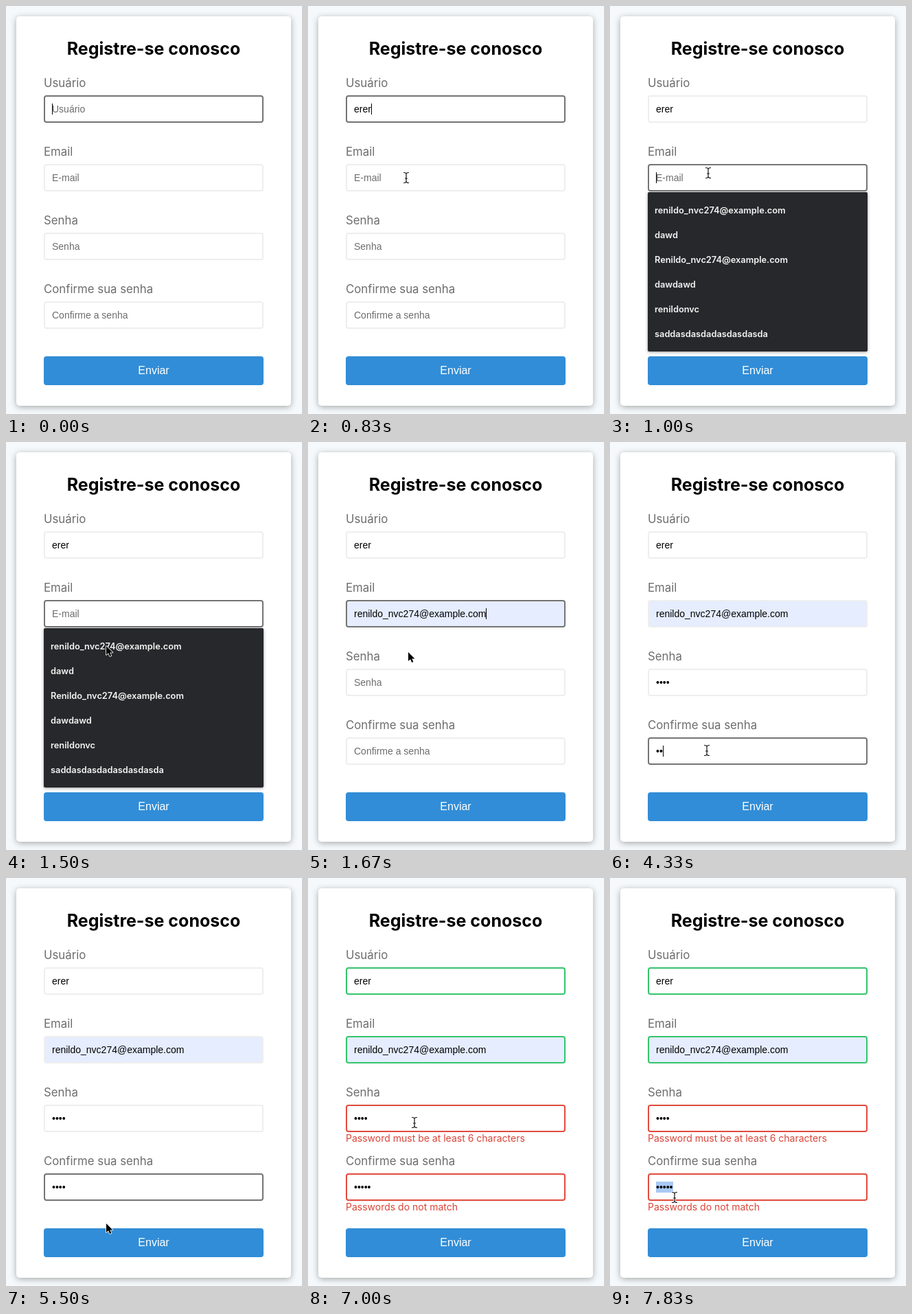
Animation, 431 px wide and 594 px high, one loop 8000 ms. Source, as an HTML page:

```html
<!DOCTYPE html>
<html lang="pt-BR">
<head>
<meta charset="utf-8">
<title>Registre-se conosco</title>
<style>
  html, body { margin: 0; width: 100%; height: 100%; overflow: hidden; background: #f5f9fb; }
  svg { display: block; width: 100%; height: 100%; }
  .card { fill: #fff; filter: drop-shadow(0 2px 5px rgba(0, 0, 0, .32)); }
  .title { font: 700 25px Inter, sans-serif; fill: #000; text-anchor: middle; }
  .label { font: 16.8px Inter, sans-serif; fill: #6d6d6d; }
  .value { font: 14px "Liberation Sans", Arial, sans-serif; fill: #000; }
  .hint { fill: #6c6c6c; }
  .error { font: 14px Inter, sans-serif; fill: #db4437; }
  .button { fill: #318dd7; }
  .send { font: 16px "Liberation Sans", Arial, sans-serif; fill: #fff; text-anchor: middle; }
  .menu { fill: #27282b; filter: drop-shadow(0 1px 2px rgba(0, 0, 0, .4)); }
  .option { font: 600 12.8px Inter, sans-serif; fill: #f4f4f4; }
  .selection { fill: #a9c9f3; }
</style>
</head>
<body>
<svg id="stage" viewBox="0 0 431 594"></svg>
<script>
const LOOP = 8000, STEPS_PER_SECOND = 6;
const EMAIL = 'renildo_nvc274@example.com';
const OPTIONS = [EMAIL, 'dawd', 'Renildo_nvc274@example.com', 'dawdawd', 'renildonvc', 'saddasdasdadasdasdasda'];
const COLORS = { idle: '#eeeeee', focus: '#747474', ok: '#35c46d', bad: '#e14b3d' };

// Steps at which things happen, six per second
const KEYS = { user: [1, 2, 3, 4], password: [16, 17, 18, 19], confirm: [25, 26, 27, 28, 35] };
const FOCUS = [[0, 0], [6, 1], [14, 2], [23, 3], [38, -1]];
const MENU_OPEN = 6, EMAIL_PICKED = 10, SUBMIT = 38, SELECT = 46;
const POINTER = [
  [5, 143, 250], [6, 143, 243], [8, 146, 297], [9, 146, 297], [10, 146, 306],
  [13, 141, 349], [20, 141, 349], [23, 141, 449], [29, 141, 449], [33, 146, 503],
  [36, 148, 529], [39, 148, 529], [42, 155, 356], [44, 132, 440], [46, 94, 465]
];

const stage = document.getElementById('stage');

function add(tag, attrs, text = '', parent = stage) {
  const node = document.createElementNS(stage.namespaceURI, tag);
  for (const key in attrs) node.setAttribute(key, attrs[key]);
  node.textContent = text;
  return parent.appendChild(node);
}
const show = (node, on) => node.setAttribute('visibility', on ? 'visible' : 'hidden');
const label = (cls, x, y, text, parent) => add('text', { class: cls, x, y }, text, parent);

add('rect', { class: 'card', x: 15, y: 15, width: 400, height: 567, rx: 5 });
label('title', 215, 71, 'Registre-se conosco');

const fields = [
  ['Usuário', 'Usuário'],
  ['Email', 'E-mail'],
  ['Senha', 'Senha', 'Password must be at least 6 characters'],
  ['Confirme sua senha', 'Confirme a senha', 'Passwords do not match']
].map(([name, hint, error], i) => {
  const y = 130 + i * 100;
  label('label', 55, y - 12, name);
  return {
    y, hint,
    box: add('rect', { x: 56, y: y + 1, width: 318, height: 38, rx: 3, 'stroke-width': 2 }),
    mark: add('rect', { class: 'selection', x: 67, y: y + 12, width: 25, height: 16, visibility: 'hidden' }),
    text: label('value', 67, y + 25, hint),
    error: error && label('error', 55, y + 254 - 200, error)
  };
});

add('rect', { class: 'button', x: 55, y: 510, width: 320, height: 42, rx: 4 });
label('send', 215, 536, 'Enviar');

const caret = add('rect', { width: 1, height: 16 });
const menu = add('g', {});
add('rect', { class: 'menu', x: 55, y: 271, width: 320, height: 232, rx: 2 }, '', menu);
OPTIONS.forEach((text, i) => label('option', 65, 302 + i * 36, text, menu));

const outline = { stroke: '#fff', 'stroke-linejoin': 'round', 'paint-order': 'stroke' };
const arrow = add('path', { ...outline, d: 'M0 0V13L3 10.3L5.2 15L7.4 14L5.3 9.5H9.5Z', 'stroke-width': 1.6 });
const beam = add('g', { fill: 'none', 'stroke-linecap': 'round' });
for (const [stroke, width] of [['#fff', 2.8], ['#111', 1.2]])
  add('path', { d: 'M-3.5-7.5Q0-7.5 0-5Q0-7.5 3.5-7.5M0-5V5M-3.5 7.5Q0 7.5 0 5Q0 7.5 3.5 7.5M-1.5 1H1.5', stroke, 'stroke-width': width }, '', beam);

const typed = (keys, step) => keys.filter(k => k <= step).length;

function pointerAt(step) {
  const next = POINTER.findIndex(p => p[0] > step);
  if (next < 0) return POINTER.at(-1).slice(1);
  const [a, b] = [POINTER[Math.max(next - 1, 0)], POINTER[next]];
  const u = Math.max(0, (step - a[0]) / (b[0] - a[0]));
  const ease = u * u * (3 - 2 * u);
  return [1, 2].map(i => a[i] + (b[i] - a[i]) * ease);
}

function borderColor(i, focus, step) {
  if (step >= SUBMIT) return i < 2 ? COLORS.ok : COLORS.bad;
  return i === focus ? COLORS.focus : COLORS.idle;
}

function render(step) {
  const [, focus] = FOCUS.findLast(f => f[0] <= step);
  const picked = step >= EMAIL_PICKED;
  const menuOpen = step >= MENU_OPEN && !picked;
  const values = [
    'erer'.slice(0, typed(KEYS.user, step)),
    picked ? EMAIL : '',
    '•'.repeat(typed(KEYS.password, step)),
    '•'.repeat(typed(KEYS.confirm, step))
  ];

  fields.forEach((field, i) => {
    field.text.textContent = values[i] || field.hint;
    field.text.setAttribute('class', values[i] ? 'value' : 'value hint');
    field.box.setAttribute('fill', i === 1 && picked ? '#e5edfe' : '#fff');
    field.box.setAttribute('stroke', borderColor(i, focus, step));
    if (field.error) show(field.error, step >= SUBMIT);
  });
  show(fields[3].mark, step >= SELECT);
  show(menu, menuOpen);

  // The caret restarts its blink on every key or focus change
  const events = [...Object.values(KEYS).flat(), ...FOCUS.map(f => f[0]), EMAIL_PICKED];
  const last = Math.max(...events.filter(e => e <= step));
  show(caret, focus >= 0 && Math.floor((step - last) / 3) % 2 === 0);
  if (focus >= 0) {
    const width = values[focus] ? fields[focus].text.getComputedTextLength() : 0;
    caret.setAttribute('x', Math.round(67 + width));
    caret.setAttribute('y', fields[focus].y + 12);
  }

  const [x, y] = pointerAt(step);
  const visible = step >= POINTER[0][0];
  const overField = fields.some(f => y >= f.y && y <= f.y + 40) && !(menuOpen && y > 270);
  for (const [node, on] of [[arrow, !overField], [beam, overField]]) {
    node.setAttribute('transform', `translate(${x} ${y})`);
    show(node, visible && on);
  }
}

const start = performance.now();
function tick(now) {
  const time = Math.max(0, now - start) % LOOP;
  render(Math.floor(time * STEPS_PER_SECOND / 1000 + .03));
  requestAnimationFrame(tick);
}
render(0);
requestAnimationFrame(tick);
</script>
</body>
</html>
```
